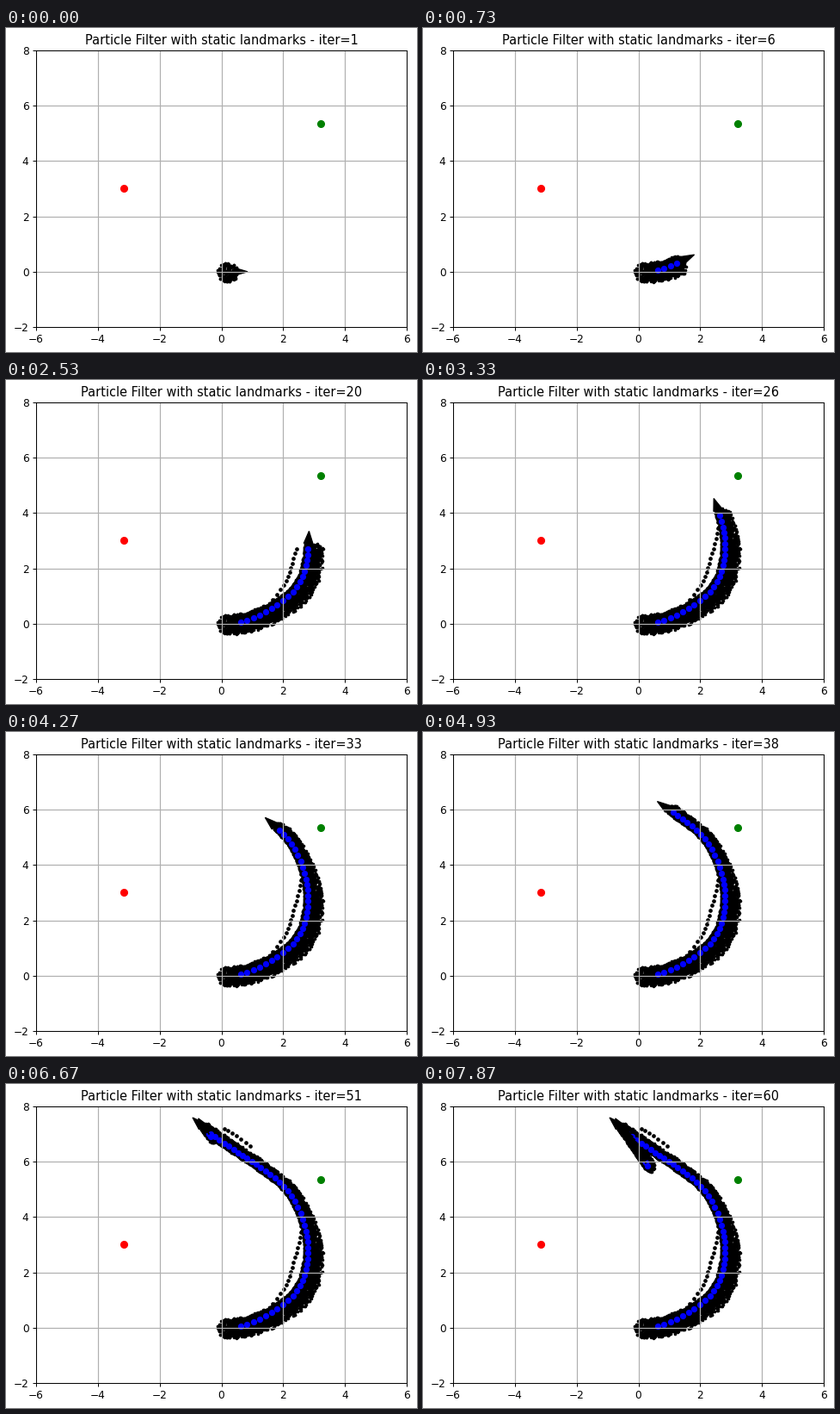
A matplotlib script for the animation above (8 s loop, 478x376 px).

```python
import numpy as np
import matplotlib.pyplot as plt
from matplotlib.animation import FuncAnimation

W, H, DPI = 478, 376, 87
STEPS, LOOP, TICK = 60, 8000, 40
TURN = 49          # last step before the robot backs up
CLOUD = 160        # particles per step

rng = np.random.default_rng(4)
step = np.arange(1, STEPS + 1)

# Evenly timed key points; the outer two only set the end tangents.
keys = np.array([(-1, .42), (.2, 0), (1.43, .42), (2.44, 1.33), (2.79, 2.5),
                 (2.7, 3.7), (2.15, 4.95), (1.27, 5.78), (.39, 6.44),
                 (-.48, 7.13), (-.95, 7.82)])
END = np.array([.3, 5.85])


def spline(u):
    """Catmull-Rom position and tangent for u in 0..1."""
    u = u * (len(keys) - 3)
    k = min(int(u), len(keys) - 4)
    t = u - k
    a, b, c, d = keys[k:k + 4]
    p1, p2, p3 = c - a, 2 * a - 5 * b + 4 * c - d, 3 * (b - c) + d - a
    return b + (p1 * t + p2 * t**2 + p3 * t**3) / 2, p1 + 2 * p2 * t + 3 * p3 * t**2


def robot(s):
    """Position and heading unit vector at step s."""
    if s <= TURN:
        pos, way = spline((s - 1) / (TURN - 1))
    else:
        way = keys[-2] - END
        pos = keys[-2] - way * (s - TURN) / (STEPS - TURN)
    return pos, way / np.hypot(*way)


poses = [robot(s) for s in step]


def place(i, along, side):
    """Points given along the heading and to its left at one step."""
    pos, way = poses[i]
    normal = np.array([-way[1], way[0]])
    return pos + np.outer(along, way) + np.outer(side, normal)


def cloud(i):
    s = step[i]
    left = .13 + .2 * np.exp(-(s / 9) ** 2)
    right = .24 + .33 * np.exp(-((s - 13) / 13) ** 2)
    r = rng.random(CLOUD) ** .6
    a = rng.uniform(0, 2 * np.pi, CLOUD)
    side = r * np.sin(a)
    reach = .33 if s == 1 else .25
    return place(i, reach * r * np.cos(a),
                 side * np.where(side > 0, left, right))


def stray(i):
    s = step[i]
    if 8 < s < 27:
        return place(i, 0, .45 * np.sin(np.pi * (s - 5) / 22))
    if 43 <= s <= TURN:
        return place(i, -.35, -.45)
    return np.full((1, 2), np.nan)


particles = np.concatenate([cloud(i) for i in range(STEPS)])
strays = np.concatenate([stray(i) for i in range(STEPS)])

fig = plt.figure(figsize=((W + 1e-6) / DPI, (H + 1e-6) / DPI), dpi=DPI,
                 facecolor="white")
ax = fig.add_axes([35 / W, 1 - 347 / H, 431 / W, 321 / H])
ax.set(xlim=(-6, 6), ylim=(-2, 8))
ax.grid(True, lw=1)
ax.plot(-3.17, 3, "ro", ms=6.5)
ax.plot(3.22, 5.35, "go", ms=6.5)
title = ax.set_title("")

dots, = ax.plot([], [], "ko", ms=3, mew=0, zorder=1)
stray_dots, = ax.plot([], [], "ko", ms=3.9, mew=0, zorder=1)
marks = []
for s, (pos, way) in zip(step, poses):
    group = [ax.arrow(*pos, *(.2 * way), head_width=.3, head_length=.45,
                      color="black", zorder=1)]
    if s > 2:
        group += ax.plot(*pos, "bo", ms=6, mew=0, zorder=1)
    marks.append(group)


def update(k):
    n = (k * TICK + 30) * STEPS // LOOP + 1
    dots.set_data(*particles[:n * CLOUD].T)
    stray_dots.set_data(*strays[:n].T)
    for s, group in zip(step, marks):
        for artist in group:
            artist.set_visible(s <= n)
    title.set_text(f"Particle Filter with static landmarks - iter={n}")
    return [dots, stray_dots, title]


anim = FuncAnimation(fig, update, frames=LOOP // TICK, interval=TICK,
                     repeat=True, repeat_delay=0)
plt.show()
```
